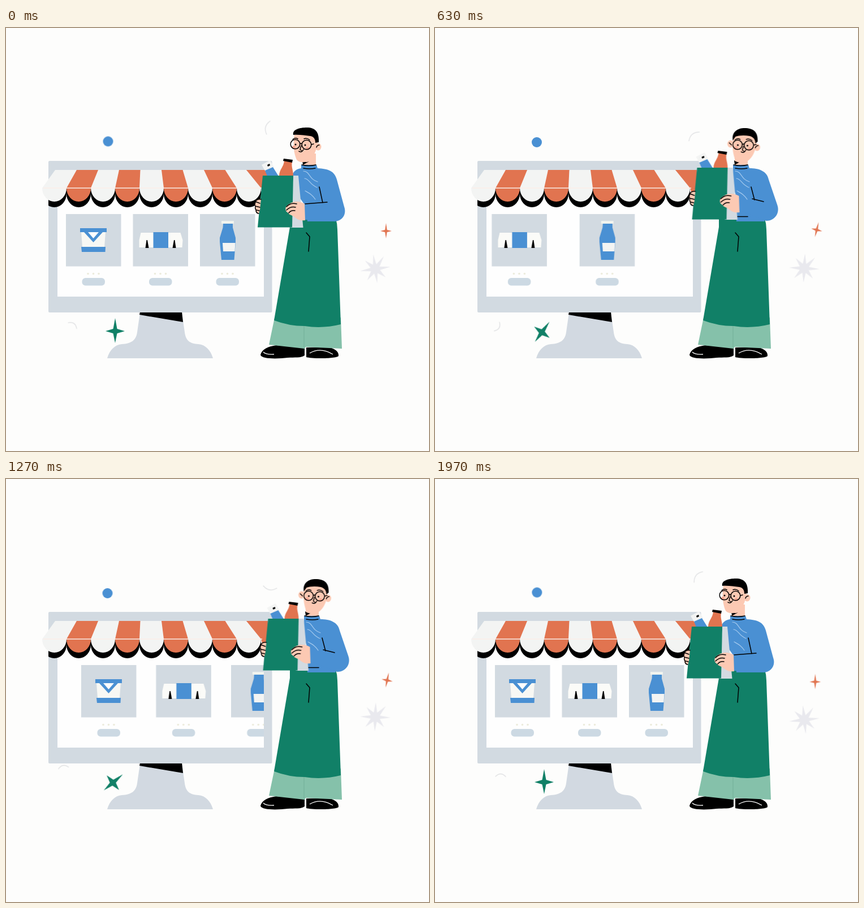
Animation of 748 by 748 pixels, one loop 2010 ms. Source, as an HTML page without scripts:

```html
<!DOCTYPE html>
<html lang="en">
<head>
<meta charset="utf-8">
<title>Online shop</title>
<style>
html, body { margin: 0; width: 100%; height: 100%; overflow: hidden; background: #fdfdfc; }
svg { display: block; width: 100vw; height: 100vh; }

.grey { fill: #d2dae1; }
.stand { fill: #d2d9e1; }
.white { fill: #fefefe; }
.pale { fill: #f3f4f3; }
.blue { fill: #4a90d3; }
.orange { fill: #e17450; }
.green { fill: #118067; }
.mint { fill: #85c1aa; }
.skin { fill: #fcc9b3; }
.ink { fill: none; stroke: #000; stroke-width: 1.5; stroke-linecap: round; stroke-linejoin: round; }
.fold { fill: none; stroke: #a5caee; stroke-width: 1.2; stroke-linecap: round; }
.curl { fill: none; stroke: #dfe0e2; stroke-width: 1.3; stroke-linecap: round; }

.card, .dot, .spark, .spark2, .burst, .arc1, .arc2, .bag, .head, .face, .ear, .neck, .torso, .cuff, .hair, .open, .brow {
  animation: 2010ms linear infinite;
}
.bag, .head, .face, .ear, .neck, .torso, .cuff, .hair, .brow { animation-timing-function: ease-in-out; }

.card { animation-name: slide; }
.c2 { animation-delay: 70ms; }
.c3 { animation-delay: 140ms; }
@keyframes slide {
  0%, 2.5% { transform: translateX(0); }
  9.45% { transform: translateX(-6px); }
  12.9% { transform: translateX(-13px); }
  16.4% { transform: translateX(-24px); }
  20.4% { transform: translateX(-47px); }
  24.4% { transform: translateX(-87px); }
  27.9% { transform: translateX(-124px); }
  31.3% { transform: translateX(-165px); }
  34.8% { transform: translateX(-225px); }
  38.8% { transform: translateX(-298px); }
  42.8% { transform: translateX(-354px); }
  46.3% { transform: translateX(-389px); }
  49.75% { transform: translateX(-421px); }
  56.2% { transform: translateX(-465px); }
  63.2% { transform: translateX(-493px); }
  69.7% { transform: translateX(-508px); }
  76.1% { transform: translateX(-517px); }
  84.6%, 100% { transform: translateX(-520px); }
}

.bag { animation-name: lift; }
@keyframes lift {
  0%, 4%, 82%, 100% { transform: translate(0, 0); }
  16.4%, 74% { transform: translate(0, 2px); }
  29%, 64% { transform: translate(9.5px, -14px); }
}
.head { animation-name: turn; }
@keyframes turn {
  0%, 4%, 82%, 100% { transform: translate(-17px, -1px); }
  16.4%, 74% { transform: translate(-5px, 4px); }
  29%, 64% { transform: translate(.5px, 0); }
}
.face { animation-name: look; }
@keyframes look {
  0%, 4%, 82%, 100% { transform: translate(-6px, 0); }
  16.4%, 74% { transform: translate(-1px, 1px); }
  29%, 64% { transform: translate(0, 0); }
}
.brow { animation-name: frown; }
@keyframes frown {
  0%, 4%, 82%, 100%, 29%, 64% { transform: translateY(0); }
  16.4%, 74% { transform: translateY(4px); }
}
.ear { animation-name: peek; }
@keyframes peek {
  0%, 4%, 82%, 100% { transform: translateX(13px); }
  16.4%, 74%, 29%, 64% { transform: translateX(0); }
}
.neck { animation-name: nod; }
@keyframes nod {
  0%, 4%, 82%, 100% { transform: translate(-5px, 0); }
  16.4%, 74% { transform: translate(0, 4px); }
  29%, 64% { transform: translate(0, 0); }
}
.torso { animation-name: sway; }
@keyframes sway {
  0%, 4%, 82%, 100% { d: path("M522 242L549 242L551 248C570 249 581 253 585 268L598 316C603 330 594 342 580 342L527 339L527 311L512 290L506 262C508 252 515 249 522 248Z"); }
  16.4%, 74% { d: path("M527 246L553 246L555 250C572 250 582 254 586 269L599 317C604 331 595 343 581 343L527 341L527 313L512 291L506 264C508 254 515 251 526 250Z"); }
  29%, 64% { d: path("M527 242L554 242L556 248C573 248 587 253 590 268L605 312C611 328 600 341 586 341L535 321L540 295L527 290L526 262C526 252 527 249 527 248Z"); }
}
.cuff { animation-name: bend; }
@keyframes bend {
  0%, 4%, 82%, 100%, 16.4%, 74% { d: path("M554 281L560 309M529 311L568 308"); }
  29%, 64% { d: path("M559 281L565 304M561 302L581 307"); }
}
.hair { animation-name: comb; }
@keyframes comb {
  0%, 4%, 82%, 100% { d: path("M525 190C523 181 535 177 549 177C565 177 571 186 570 203L564 204C564 197 561 193 555 192C545 191 535 189 525 190Z"); }
  16.4%, 29%, 64%, 74% { d: path("M526 199C524 184 534 177 547 177C563 177 571 184 570 201L566 204C566 196 562 193 556 191C546 189 536 190 531 192Z"); }
}
.open { animation-name: wink; animation-timing-function: step-end; }
@keyframes wink { 0%, 20%, 77% { opacity: 1; } 12%, 71% { opacity: 0; } }

.dot { animation-name: drift; }
@keyframes drift {
  0%, 100% { transform: translate(180.5px, 200.5px); }
  16.4% { transform: translate(180.5px, 201px); }
  31.3% { transform: translate(180px, 202px); }
  63.2% { transform: translate(179.5px, 202px); }
  83% { transform: translate(179.3px, 201.3px); }
}
.spark { animation-name: spin; }
@keyframes spin {
  0%, 98%, 100% { transform: translate(193px, 536px) rotate(0); }
  16.4% { transform: translate(188px, 538px) rotate(48deg); }
  31.3% { transform: translate(189px, 538px) rotate(36deg); }
  49.75% { transform: translate(189px, 538px) rotate(20deg); }
  63.2% { transform: translate(189px, 537px) rotate(50deg); }
  83% { transform: translate(193px, 536px) rotate(0); }
}
.spark2 { animation-name: spin2; }
@keyframes spin2 {
  0%, 100% { transform: translate(672px, 359px) rotate(0); }
  16.4% { transform: translate(674px, 360px) rotate(25deg); }
  31.3% { transform: translate(675px, 357px) rotate(14deg); }
  49.75% { transform: translate(673px, 357px) rotate(24deg); }
  63.2% { transform: translate(674px, 356px) rotate(12deg); }
  83% { transform: translate(675px, 356px) rotate(2deg); }
}
.burst { animation-name: sway2; }
@keyframes sway2 {
  0%, 100% { transform: translate(653px, 426px) rotate(-8deg); }
  16.4% { transform: translate(655px, 425px) rotate(8deg); }
  31.3% { transform: translate(653px, 425px) rotate(3deg); }
  49.75% { transform: translate(652px, 425px) rotate(0); }
  63.2% { transform: translate(653px, 421px) rotate(2deg); }
  83% { transform: translate(654px, 425px) rotate(10deg); }
}
.arc1, .arc2 { animation-duration: 1005ms; }
.arc1 { animation-name: curl1; }
@keyframes curl1 {
  0% { transform: translate(459px, 175px) rotate(15deg); }
  26.4% { transform: translate(466px, 196px) rotate(-80deg); }
  32.8% { transform: translate(470px, 195px) rotate(-90deg); }
  62.7% { transform: translate(455px, 188px) rotate(-310deg); }
  96% { transform: translate(462px, 170px) rotate(-320deg); }
  100% { transform: translate(459px, 175px) rotate(-345deg); }
}
.arc2 { animation-name: curl2; }
@keyframes curl2 {
  0% { transform: translate(120px, 523px) rotate(35deg); }
  26.4% { transform: translate(101px, 507px) rotate(-10deg); }
  32.8% { transform: translate(106px, 507px) rotate(0); }
  62.7% { transform: translate(113px, 530px) rotate(120deg); }
  66.2% { transform: translate(109px, 535px) rotate(170deg); }
  96% { transform: translate(116px, 522px) rotate(360deg); }
  100% { transform: translate(120px, 523px) rotate(395deg); }
}
</style>
</head>
<body>
<svg viewBox="0 0 748 748">
  <defs>
    <clipPath id="screen"><rect x="91" y="253" width="365" height="222"/></clipPath>
    <clipPath id="front"><rect x="75" y="283" width="380" height="40"/></clipPath>
    <g id="panel">
      <rect class="grey" y="329" width="97.5" height="92.5"/>
      <g fill="#ecebdc"><circle cx="39" cy="434.5" r="1.8"/><circle cx="48.5" cy="434.5" r="1.8"/><circle cx="58" cy="434.5" r="1.8"/></g>
      <rect x="28.5" y="442" width="40.5" height="13.5" rx="6" fill="#ccd9e3"/>
    </g>
    <g id="tub">
      <use href="#panel"/>
      <path fill="#f8f8f4" d="M27 360H70L68 388H29Z"/>
      <path class="blue" d="M25 354H72V361H65L48.5 379L32 361H25ZM27 387H70L69.5 396H28Z"/>
      <path class="white" d="M39 361H58L48.5 372Z"/>
    </g>
    <g id="wrap">
      <use href="#panel"/>
      <path fill="#fbfbf8" d="M14 362H84L88 375L87 388H11V375Z"/>
      <path d="M22 389L24 375H25.500L28 389ZM70 389L72.500 375H74L76 389Z"/>
      <rect class="blue" x="36" y="361" width="26.5" height="28"/>
    </g>
    <g id="bottle">
      <use href="#panel"/>
      <rect x="38" y="341" width="22" height="5" rx="1" fill="#f1f3ee"/>
      <path class="blue" d="M41 346H58V353L63 371V378L60.5 410H38L35 378V371L40.5 353Z"/>
      <path class="pale" d="M40 380H62.5L61.5 395H41Z"/>
    </g>
  </defs>

  <!-- monitor -->
  <path class="stand" d="M237 503H311L316 538C318 553 325 558 340 559C353 560 362 570 366 584H179C183 570 192 560 205 559C222 558 230 552 232 538Z"/>
  <path d="M237 502H311L313 520L236 507Z"/>
  <rect class="grey" x="75" y="235" width="395.5" height="268" rx="2"/>
  <rect class="white" x="91" y="253" width="365" height="222"/>
  <g clip-path="url(#screen)">
    <g class="card"><use href="#tub" x="106"/><use href="#tub" x="626"/></g>
    <g class="card c2"><use href="#wrap" x="224.5"/><use href="#wrap" x="744.5"/></g>
    <g class="card c3"><use href="#bottle" x="343"/><use href="#bottle" x="863"/></g>
  </g>

  <!-- awning -->
  <path clip-path="url(#front)" d="M64 283V293a21.5 24 0 0 0 43 0a21.5 24 0 0 0 43 0a21.5 24 0 0 0 43 0a21.5 24 0 0 0 43 0a21.5 24 0 0 0 43 0a21.5 24 0 0 0 43 0a21.5 24 0 0 0 43 0a21.5 24 0 0 0 43 0a21.5 24 0 0 0 43 0V283Z"/>
  <path class="pale" d="M87 251L64 283a21.5 24 0 0 0 43 0L125 251ZM163 251L150 283a21.5 24 0 0 0 43 0L200 251ZM237.500 251L236 283a21.5 24 0 0 0 43 0L275 251ZM312.500 251L322 283a21.5 24 0 0 0 43 0L350 251ZM387.500 251L408 283a21.5 24 0 0 0 43 0L425 251Z"/>
  <path class="orange" d="M125 251L107 283a21.5 24 0 0 0 43 0L163 251ZM200 251L193 283a21.5 24 0 0 0 43 0L237.500 251ZM275 251L279 283a21.5 24 0 0 0 43 0L312.500 251ZM350 251L365 283a21.5 24 0 0 0 43 0L387.500 251ZM425 251L451 283L456 300L467 283L463 251Z"/>
  <path d="M66 283H453" stroke="#fbeee9" stroke-width="1.3"/>

  <!-- ornaments -->
  <circle class="dot blue" r="9"/>
  <path class="spark green" d="M0-23L3.500-4L17 0L3.500 4L0 21L-3.500 4L-17 0L-3.500-4Z"/>
  <path class="spark2 orange" d="M0-14L1.800-2L10 0L1.800 2L0 13L-1.800 2L-10 0L-1.800-2Z"/>
  <path class="burst" fill="#e9e9ee" d="M0-26L3-8L18-20L8-3L27 0L8 3L16 17L3 8L0 25L-3 8L-17 18L-8 3L-27 0L-8-3L-16-17L-3-8Z"/>
  <path class="arc1 curl" d="M5-12Q-5 0 5 12"/>
  <path class="arc2 curl" d="M-9 4Q0-5 9 4"/>

  <!-- trousers and shoes -->
  <path d="M450 578C452 568 464 563 478 561L528 565V579C522 584 510 582 498 583C482 585 452 586 450 578ZM531 565L570 564C580 567 589 571 588 580C584 585 540 585 531 582Z"/>
  <path d="M455 573Q460 578 474 577M537 575Q556 564 578 577" fill="none" stroke="#fff" stroke-width="1.3"/>
  <path class="mint" d="M475 512L592 512L594 567L530 564L528 567L465 560Z"/>
  <path class="green" d="M502 337H583Q586 346 586 356L592 524Q560 532 528 527Q500 527 474 517L502 352Z"/>
  <path d="M527 527V565" stroke="#72af98"/>
  <path class="ink" d="M531 362L537 369L535 395"/>

  <!-- body -->
  <path class="blue" d="M530 262H575L583 342H533Z"/>
  <path class="ink" d="M534 333.5H553" stroke-width="2.5"/>
  <g class="neck">
    <path class="skin" d="M530 222H553V246H530Z"/>
    <path d="M529 234Q534 239 541 236L530 242Z"/>
  </g>
  <path class="torso blue" d="M522 242L549 242L551 248C570 249 581 253 585 268L598 316C603 330 594 342 580 342L527 339L527 311L512 290L506 262C508 252 515 249 522 248Z"/>
  <g class="neck">
    <path class="ink" d="M528 242Q540 245 553 242M531 248Q542 250 552 248" stroke-width="1.2"/>
    <path class="fold" d="M531 253C543 254 540 267 556 272M533 266C542 267 541 276 555 282M534 288C541 292 546 294 552 303"/>
  </g>
  <path class="cuff ink" d="M554 281L560 309M529 311L568 308"/>

  <!-- head -->
  <g class="head">
    <g class="ear">
      <ellipse class="skin" cx="522" cy="205" rx="5.5" ry="6.5"/>
      <path class="ink" d="M520 203L524 207" stroke-width="1"/>
    </g>
    <ellipse class="skin" cx="569" cy="211" rx="5.5" ry="6.5"/>
    <path class="skin" d="M527 190C524 205 526 224 531 234C537 241 549 239 556 232C563 225 567 215 568 200L566 188Z"/>
    <path class="ink" d="M566 212Q567 208 571 208" stroke-width="1.2"/>
    <path class="hair" d="M525 190C523 181 535 177 549 177C565 177 571 186 570 203L564 204C564 197 561 193 555 192C545 191 535 189 525 190Z"/>
    <g class="face">
      <g fill="#f7a995"><circle cx="532" cy="212" r="3"/><circle cx="556" cy="214" r="3"/></g>
      <path class="brow ink" d="M530 198Q534 194 539 197M550 197Q555 195 560 199" stroke-width="3"/>
      <circle class="ink" cx="534.5" cy="206.5" r="8.3"/>
      <circle class="ink" cx="554.5" cy="207.5" r="8.3"/>
      <path class="ink" d="M543 206Q544.5 204 546 206M563 207L567 206M545 209L543 216L546 218M541 219Q546 222 549 216" stroke-width="1.2"/>
      <g class="open"><circle cx="535" cy="207" r="1.5"/><circle cx="552" cy="208" r="1.5"/></g>
    </g>
  </g>

  <!-- shopping -->
  <g class="bag">
    <path class="pale" d="M452 242L467 234L474 246L459 254Z"/>
    <path d="M462 242L466 240L467 243L463 245Z"/>
    <path class="blue" d="M458 252L472 246L482 262H462Z"/>
    <path class="orange" d="M492 235L506 237C504 246 508 250 508 262H483C483 250 491 246 492 235Z"/>
    <path d="M491 231L507 233L506 238L490 235Z"/>
    <path class="grey" d="M508 261H517L525.5 353H503Z"/>
    <path class="green" d="M454 261H508L506 352.5H445Z"/>
    <path class="skin" d="M451 302C445 302 441 304 441 308C439 312 440 316 441 319C440 324 443 329 447 328L449 322Z"/>
    <path class="ink" d="M451 303Q444 302 441 307L449 310M441 308Q439 313 441 315L449 317M441 316Q440 321 443 322L448 323M442 323Q443 328 447 328" stroke-width="1.3"/>
    <path class="skin" d="M528 311C516 304 504 307 496 315C493 319 494 325 499 327C501 331 507 331 511 335C517 340 523 341 529 340Z"/>
    <path class="ink" d="M514 311Q503 308 496 316M512 317Q503 315 496 322M511 323Q504 322 500 327" stroke-width="1.3"/>
  </g>
</svg>
</body>
</html>
```
